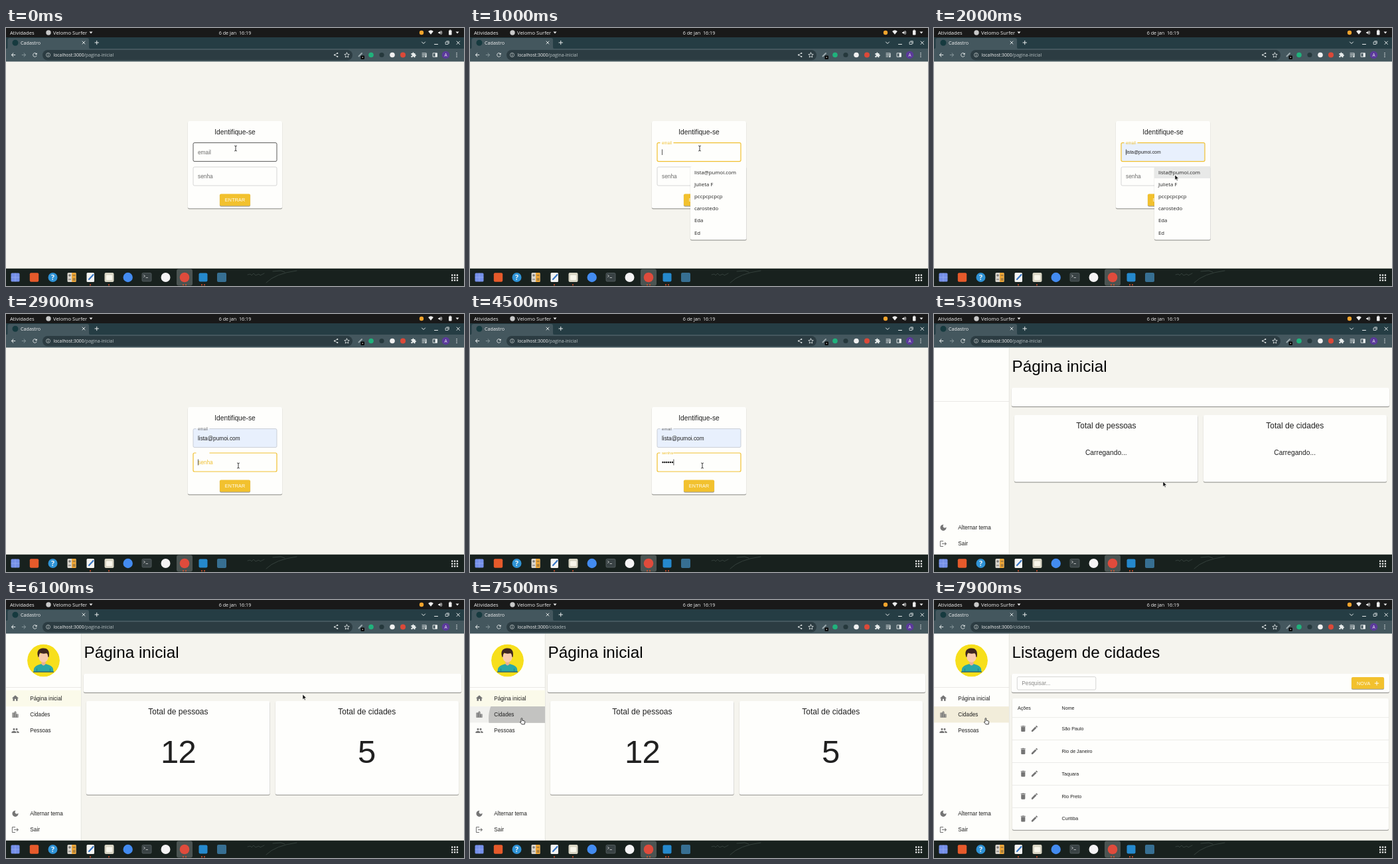
Recreate the animation shown at these times as an HTML page. Size 690 by 388 pixels, loop 8 s.

```html
<!DOCTYPE html>
<html lang="pt-BR">
<head>
<meta charset="utf-8">
<title>Cadastro</title>
<style>
html, body { margin: 0; width: 100%; height: 100%; overflow: hidden; background: #f5f4ee; }
svg { display: block; width: 100vw; height: 100vh; }
text { font-family: "Liberation Sans", Arial, sans-serif; fill: #202020; white-space: pre; }
.ui text { font-family: "Open Sans", "Noto Sans", sans-serif; fill: #f2f2f2; }
.menu text { font-family: "Open Sans", "Noto Sans", sans-serif; }
.line { fill: none; stroke-linecap: round; stroke-linejoin: round; }
</style>
</head>
<body>
<svg id="stage" viewBox="0 0 690 388" preserveAspectRatio="none"></svg>
<script>
const LOOP = 8000, LOGIN_END = 5100, DATA = 5600, LIST = 7600;
const EMAIL = 'lista@pumoi.com';
const YELLOW = '#f0c030';

// Drawing helpers
const text = (x, y, size, str, more = '') => `<text x="${x}" y="${y}" font-size="${size}" ${more}>${str}</text>`;
const mid = (x, y, size, str, more = '') => text(x, y, size, str, `text-anchor="middle" ${more}`);
const rect = (x, y, w, h, fill, r = 0, more = '') =>
  `<rect x="${x}" y="${y}" width="${w}" height="${h}" rx="${r}" fill="${fill}" ${more}/>`;
const raised = (x, y, w, h, fill) =>
  rect(x - .4, y + .4, w + .8, h + 1, '#0000001c', 2.400) + rect(x, y + 1, w, h, '#00000050', 2) + rect(x, y, w, h, fill, 2);
const paper = (x, y, w, h) => raised(x, y, w, h, '#fefefc');
const button = (x, y, w, h) => raised(x, y, w, h, '#f2c12e');
const dot = (x, y, r, fill) => `<circle cx="${x}" cy="${y}" r="${r}" fill="${fill}"/>`;
const line = (d, color, w = 1) => `<path class="line" d="${d}" stroke="${color}" stroke-width="${w}"/>`;
const during = (from, to, body) => `<g data-on="${from} ${to}">${body}</g>`;

const ICONS = {
  home: 'M10 20v-6h4v6h5v-8h3L12 3 2 12h3v8z',
  city: 'M15 11V5l-3-3-3 3v2H3v14h18V11h-6zm-8 8H5v-2h2v2zm0-4H5v-2h2v2zm0-4H5V9h2v2zm6 8h-2v-2h2v2zm0-4h-2v-2h2v2zm0-4h-2V9h2v2zm0-4h-2V5h2v2zm6 12h-2v-2h2v2zm0-4h-2v-2h2v2z',
  people: 'M16 11a3 3 0 100-6 3 3 0 000 6zM8 11a3 3 0 100-6 3 3 0 000 6zm0 2c-2.3 0-7 1.2-7 3.5V19h14v-2.5c0-2.3-4.7-3.5-7-3.5zm8 0l-1 .05c1.2.85 2 2 2 3.45V19h6v-2.5c0-2.3-4.7-3.5-7-3.5z',
  moon: 'M12 3a9 9 0 109 9c0-.5 0-.9-.1-1.4a5.4 5.4 0 01-4.4 2.3 5.4 5.4 0 01-3.1-9.8C12.900 3 12.500 3 12 3z',
  exit: 'M17 7l-1.400 1.400L18.200 11H8v2h10.200l-2.600 2.600L17 17l5-5zM4 5h8V3H4a2 2 0 00-2 2v14a2 2 0 002 2h8v-2H4z',
  trash: 'M6 19a2 2 0 002 2h8a2 2 0 002-2V7H6zM19 4h-3.500l-1-1h-5l-1 1H5v2h14z',
  pencil: 'M3 17.250V21h3.750L17.800 9.900l-3.750-3.750zM20.700 7a1 1 0 000-1.400l-2.300-2.300a1 1 0 00-1.400 0l-1.900 1.800 3.750 3.750z',
  back: 'M20 11H7.800l5.600-5.600L12 4l-8 8 8 8 1.400-1.400L7.800 13H20z',
  next: 'M4 11h12.200l-5.600-5.600L12 4l8 8-8 8-1.400-1.400 5.600-5.600H4z',
  reload: 'M17.650 6.350A8 8 0 1019.700 14h-2.100A6 6 0 1112 6c1.700 0 3.100.7 4.200 1.800L13 11h7V4z',
  puzzle: 'M20.500 11H19V7a2 2 0 00-2-2h-4V3.500a2.500 2.500 0 00-5 0V5H4a2 2 0 00-2 2v3.800h1.500a2.700 2.700 0 010 5.400H2V20a2 2 0 002 2h3.800v-1.500a2.700 2.700 0 015.400 0V22H17a2 2 0 002-2v-4h1.500a2.500 2.500 0 000-5z',
  wifi: 'M12 21L1 7.500a17 17 0 0122 0z',
  sound: 'M3 9v6h4l5 5V4L7 9zM14 8v8a4.500 4.500 0 000-8zM14 3.500v2a7 7 0 010 13v2a9 9 0 000-17z'
};
const icon = (name, x, y, size = 12.2, fill = '#757575') =>
  `<path transform="translate(${x - size / 2} ${y - size / 2}) scale(${size / 24})" d="${ICONS[name]}" fill="${fill}"/>`;

function topBar() {
  return rect(0, 0, 690, 14, '#191919') +
    text(6, 9.700, 7.600, 'Atividades') + dot(64, 7, 3.700, '#c9c9c9') +
    text(71, 9.700, 7.700, 'Velomo Surfer') + '<path d="M125.500 5.500h5l-2.500 3z" fill="#eee"/>' +
    mid(345, 9.600, 7.200, '6 de jan  16:19') +
    dot(626, 7, 3.200, '#f3a32c') + icon('wifi', 640, 6.500, 8.500, '#eee') + icon('sound', 654.500, 7, 8.500, '#eee') +
    rect(667, 3.500, 4.500, 7, '#eee', .8) + rect(668.300, 2.600, 2, 1, '#eee') +
    '<path d="M677.500 5.500h5l-2.500 3z" fill="#eee"/>';
}

function browser() {
  const W = '#e8ecec';
  let s = rect(0, 14, 690, 18, '#253d44') +
    '<path d="M0 31.500q2.500 0 2.500-3V18q0-3 3-3H122q3 0 3 3v10.500q0 3 3 3z" fill="#44575e"/>' +
    rect(0, 31, 690, 19.500, '#44575e') +
    dot(14, 22.200, 4.500, '#163a3f') + text(22, 24.800, 7.200, 'Cadastro') +
    line('M115 20l4 4m0-4l-4 4', W, .9) + line('M134 22h5.500m-2.750-2.750v5.500', W, 1) +
    line('M626.500 21l2.500 2.500 2.500-2.500', W) + line('M645.500 24.500h5', W) +
    line('M662.500 21h3.500v3.500h-3.500zM663.800 19.800h3.500v3.500', W, .8) + line('M679 20l4.500 4.500m0-4.500l-4.500 4.500', W) +
    icon('back', 11, 40.500, 9.500, W) + icon('next', 27, 40.500, 9.500, '#85959a') + icon('reload', 43.500, 40.500, 9.500, W) +
    rect(55, 33, 467, 15.500, '#2c3c42', 7.700) +
    '<circle cx="63.500" cy="40.500" r="3" fill="none" stroke="#c5cccc" stroke-width=".8"/>' + line('M63.500 40.200v1.700M63.500 38.700v.1', '#c5cccc', .8) +
    text(71.500, 43, 6.850, 'localhost:3000');
  s += during(0, 7400, text(117.500, 43, 6.900, '/pagina-inicial', 'style="fill:#b8c2c4"'));
  s += during(7400, LOOP, text(117.500, 43, 6.900, '/cidades', 'style="fill:#b8c2c4"'));
  s += line('M499 38l-4 2.500 4 2.500', W, .7) + dot(499.300, 38, 1.100, W) + dot(495, 40.500, 1.100, W) + dot(499.300, 43, 1.100, W) +
    line('M513.500 37l1.100 2.400 2.600.3-1.900 1.800.5 2.600-2.300-1.300-2.300 1.300.5-2.600-1.900-1.800 2.600-.3z', W, .8);
  s += line('M531.500 42.500l4.500-4.500', '#9aa7ab', 2) + rect(534.500, 41.500, 5.500, 5.500, '#080808', 1) + dot(537.300, 44.300, .8, '#eee') +
    dot(550, 40.500, 3.800, '#20b27c') + dot(566, 40.500, 3.600, '#25383c') + dot(582, 40.500, 3.800, '#f0f0f0') +
    dot(598, 40.500, 4, '#dc4938') + icon('puzzle', 614, 40.500, 8.800, W);
  s += line('M627 38h6M627 40.500h6M627 43h3M633 43v-4.500', W, 1) + dot(632.300, 43, 1.200, W) +
    line('M643.500 37.800h6v5.500h-6z', W, .9) + rect(646.500, 37.800, 3, 5.500, W) +
    dot(662.500, 40.500, 5.800, '#5b3a9b') + mid(662.500, 43, 6.500, 'A') +
    [37.700, 40.500, 43.300].map(y => dot(679, y, .8, W)).join('');
  return s;
}

function dock() {
  let s = rect(0, 361.700, 690, 27, '#18211e') +
    line('M364 371l4-1 2 2 3-3 3 3 5-2 2 2 6-3M392 383q14-14 46-18M402 366l12-1 6 2', '#3b4843', .8) +
    rect(257, 362.500, 24, 25, '#4b5452', 3);
  s += rect(7.500, 368.500, 13, 13, '#7590e8', 1.500) + line('M14 369v12M8 375h12', '#a5b7f5', .5) +
    rect(35.800, 368.300, 13.400, 13.400, '#e65a2b', 2) +
    dot(70.500, 375, 7, '#2f93d6') + mid(70.500, 378.800, 10.500, '?', 'font-weight="700"') +
    rect(92.500, 368, 13, 14, '#d9d5cd', 1.500) + rect(99, 368, 6.500, 14, '#eda637', 1) +
    line('M94.500 372h3M96 370.500v3M94.500 378h3M101 372h3M101 377h3M101 379h3', '#444', .8) +
    rect(121.500, 368, 11.500, 14, '#f4f4f2', 1.500) + line('M125 378l6.500-7', '#3977c5', 2.200) +
    rect(148.500, 368, 14, 14, '#d9d6c5', 2) + rect(151, 371.500, 9, 7.500, '#f7f5ea', 1) +
    dot(183.700, 375, 7.200, '#438bf0') +
    rect(205, 368.500, 14, 12.500, '#394244', 1.500, 'stroke="#6b7476" stroke-width=".6"') + line('M207.500 371.500l2 1.500-2 1.500M211 375.500h2.500', '#eee', .7) +
    dot(240.500, 375, 7, '#f5f4f5') + dot(269, 375, 7.300, '#df4b3c') +
    rect(290.500, 368.500, 13, 13, '#2589cd', 2) + rect(318, 368, 14, 14, '#376f92', 2);
  s += [127, 155, 267, 271, 295, 299].map(x => dot(x, 386.300, 1, '#e5532d')).join('');
  for (let i = 0; i < 9; i++) s += rect(671 + i % 3 * 3.900, 370.500 + (i / 3 | 0) * 3.900, 2.300, 2.300, '#f3f3f3', .4);
  return s;
}

// Outlined field, optionally with a gap for the raised label
const outline = (y, color, w, gap) =>
  `<path d="M${gap ? 306.500 : 284} ${y}H406q2 0 2 2v24q0 2-2 2H284q-2 0-2-2v-24q0-2 2-2${gap ? 'h2.500' : ''}" fill="none" stroke="${color}" stroke-width="${w}"/>`;
const label = (id, str) => `<g id="${id}">${text(0, 0, 8.300, str, 'style="fill:inherit"')}</g>`;

function login() {
  const names = [EMAIL, 'Julieta F', 'pccpcpcpcp', 'carostedo', 'Eda', 'Ed'];
  const mailY = 172.600, passY = 209;
  let s = paper(274, 140, 142, 131.300) + mid(345, 160.300, 10.250, 'Identifique-se');
  s += during(1500, LOGIN_END, rect(282, mailY, 126, 28, '#e8f0fd', 2)) +
    during(0, 700, outline(mailY, '#303030', .8)) +
    during(700, 2900, outline(mailY, YELLOW, 1.200, true)) +
    during(2900, LOGIN_END, outline(mailY, '#b9bfc8', .7, true)) +
    label('mailLabel', 'email') +
    during(1500, 2100, text(289, 189.400, 6.850, EMAIL)) +
    during(2100, LOGIN_END, text(289, 189.600, 8.270, EMAIL)) +
    during(700, 2100, rect(289, 182.500, .7, 8.500, '#111')) +
    during(2100, 2900, rect(353.300, 182.500, .7, 8.500, '#111'));
  s += during(0, 2200, outline(passY, '#c6c6c6', .7)) +
    during(2200, 2900, outline(passY, '#303030', .8)) +
    during(2900, LOGIN_END, outline(passY, YELLOW, 1.200, true)) + label('passLabel', 'senha');
  [3300, 3500, 3500, 3700, 3900, 4100].forEach((t, i) =>
    s += during(t, LOGIN_END, dot(290.500 + i * 2.900, 223, 1.200, '#151515')));
  s += during(2900, LOGIN_END, `<g id="caret">${rect(0, 218.500, .7, 9, '#111')}</g>`);
  s += button(322, 249.500, 46, 18) +
    during(4900, LOGIN_END, rect(322, 249.500, 46, 18, '#c99c18', 2)) +
    mid(345.100, 261.200, 7.150, 'ENTRAR', 'letter-spacing=".2" style="fill:#fffdf5"');
  s += during(1000, 2100, '<g class="menu">' + paper(332, 208, 84.500, 110.500) +
    during(1500, 2100, rect(332, 208, 84.500, 18, '#e8e9e8')) +
    names.map((n, i) => text(338, 219.500 + i * 18.200, 7.800, n)).join('') + '</g>');
  return s;
}

function avatar() {
  return `<clipPath id="face"><circle cx="56.500" cy="91" r="24.500"/></clipPath><g clip-path="url(#face)">` +
    dot(56.500, 91, 24.500, '#f7df1c') +
    '<path d="M41.500 108q0-8 6-10l6-2h6l6 2q6 2 6 10z" fill="#2ba7a5"/>' +
    '<path d="M53.500 91h6v5.500q-3 4-6 0z" fill="#e9b091"/>' +
    '<path d="M49 82q0 7 2.500 9.500 5 4.500 10 0 2.500-2.500 2.500-9.500-7.500-5-15 0z" fill="#f8cbae"/>' +
    '<path d="M48.500 86q-4-12 6.500-13.500 12-1 9.500 13.500l-1.200-.5q0-4-2-5.500-6 1.500-10-.5-1.800 2.500-1.800 6z" fill="#3f2620"/>' +
    line('M46.500 107v-3.500M66.500 107v-3.500', '#1c807f', .8) + rect(41, 107.500, 31, 1.300, '#355c64') + '</g>';
}

function drawer() {
  const items = [['home', 'Página inicial'], ['city', 'Cidades'], ['people', 'Pessoas']];
  const body = avatar() +
    during(5400, LIST, rect(0, 135.700, 113, 24.400, '#fbfaea')) +
    during(6500, LIST, rect(0, 160.100, 113, 24.300, '#f1f1ee')) +
    during(LIST, LOOP, rect(0, 160.100, 113, 24.300, '#f2edda')) +
    `<clipPath id="row">${rect(0, 160.100, 113, 24.300, '#000')}</clipPath>` +
    during(7400, 7800, `<g clip-path="url(#row)"><g id="ripple">${dot(0, 0, 50, '#000')}</g></g>`) +
    items.map(([name, str], i) => icon(name, 14, 147.800 + i * 24.300) + text(36.300, 150.500 + i * 24.300, 8.200, str)).join('');
  return rect(0, 50.500, 113, 311.300, '#fefefb') + rect(112.800, 50.500, .7, 311.300, '#dededa') +
    rect(0, 131.300, 113, .6, '#dddcd8') + during(5400, LOOP, body) +
    icon('moon', 14, 321.300) + text(36.300, 324, 8.250, 'Alternar tema') +
    icon('exit', 14, 345.500) + text(36.300, 348.300, 8.250, 'Sair');
}

const heading = str => text(117.500, 86.500, 24.300, str, 'style="fill:#050505"');

function home() {
  const cards = h => paper(121, 152, 276.500, h) + paper(406, 152, 276, h);
  return heading('Página inicial') +
    during(LOGIN_END, DATA, cards(100.500) + mid(259.300, 212, 10.250, 'Carregando...') + mid(543.700, 212, 10.250, 'Carregando...')) +
    during(DATA, LIST, cards(140.700) + mid(259.500, 245.200, 49, '12', 'letter-spacing="-.7"') + mid(543.700, 245.200, 49, '5')) +
    mid(259.400, 171.800, 12.050, 'Total de pessoas') + mid(543.800, 171.800, 12.050, 'Total de cidades');
}

function list() {
  const cities = ['São Paulo', 'Rio de Janeiro', 'Taquara', 'Rio Preto', 'Curitiba'];
  const rows = cities.map((name, i) => {
    const y = 193.500 + i * 33.850;
    return rect(118, y - 17, 567, .6, '#dfdfdc') + icon('trash', 134.300, y) + icon('pencil', 151.500, y) + text(192.500, y + 2.500, 7.150, name);
  }).join('');
  return heading('Listagem de cidades') +
    rect(125.300, 115.500, 118.500, 19.500, 'none', 2, 'stroke="#c4c4c4" stroke-width=".7"') +
    text(132.300, 128.300, 8.250, 'Pesquisar...', 'style="fill:#8a8a8a"') +
    button(629, 116, 49, 17.700) +
    text(637, 127.700, 7.150, 'NOVA', 'letter-spacing=".2" style="fill:#fffdf5"') +
    line('M664.200 125.200h5.600m-2.800-2.800v5.600', '#fffdf5', 1) +
    during(LIST, 7700, paper(118, 148, 567, 29)) +
    during(7700, LOOP, paper(118, 148, 567, 197.700) + rows) +
    text(126, 164.700, 7.150, 'Ações') + text(192.500, 164.700, 7.150, 'Nome');
}

function pointer() {
  const beam = 'M-1.500-4q1.500 0 1.500 1V3q0 1-1.500 1M1.500-4Q0-4 0-3M0 3q0 1 1.500 1';
  const arrow = '<path d="M0 0v7.600l1.800-1.700 1.200 2.800 1.200-.5-1.200-2.700h2.600z" fill="#111" stroke="#fff" stroke-width=".5"/>';
  const hand = '<path d="M-1 .5a.9.9 0 011.800 0v2.700l3 .7q1 .3.9 1.500l-.5 3.500H0L-2.600 5.600q.6-1.200 1.600-.1z" fill="#fff" stroke="#111" stroke-width=".8"/>';
  const ibeam = line(beam, '#fff', 1.600) + line(beam, '#111', .8);
  return '<g id="pointer">' + during(0, 1400, ibeam) + during(1400, 2100, arrow) + during(2100, 4600, ibeam) +
    during(4600, LOGIN_END, hand) + during(LOGIN_END, 6500, arrow) + during(6500, LOOP, hand) + '</g>';
}

const stage = document.getElementById('stage');
stage.innerHTML = rect(0, 0, 690, 388, '#f5f4ee') +
  during(0, LOGIN_END, login()) +
  during(LOGIN_END, LOOP, drawer() + paper(117, 111, 569, 28) + during(LOGIN_END, LIST, home()) + during(LIST, LOOP, list())) +
  `<g class="ui">${topBar() + browser() + dock()}</g>` + pointer();

// Steps are [time, properties, jumps to the next step]
function play(el, steps) {
  const frames = steps.map(([t, props, jumps]) =>
    ({ ...props, offset: t / LOOP, easing: jumps ? `steps(${jumps}, end)` : 'step-end' }));
  const last = frames[frames.length - 1];
  if (last.offset < 1) frames.push({ ...last, offset: 1 });
  el.animate(frames, { duration: LOOP, iterations: Infinity });
}
const byId = id => document.getElementById(id);
const at = (x, y, scale = 1) => ({ transform: `translate(${x}px, ${y}px) scale(${scale})` });

for (const el of document.querySelectorAll('[data-on]')) {
  const [from, to] = el.dataset.on.split(' ').map(Number);
  const steps = [[from, { opacity: 1 }], [to, { opacity: 0 }]];
  if (from) steps.unshift([0, { opacity: 0 }]);
  play(el, steps);
}

function floatLabel(id, y, start, blur) {
  const big = at(289, y), small = at(289, y - 14.800, .75);
  play(byId(id), [[0, big], [start, big, 2], [start + 200, small]]);
  play(byId(id), [[0, { fill: '#6b6b6b' }], [start, { fill: YELLOW }], [blur, { fill: '#6b6b6b' }]]);
}
floatLabel('mailLabel', 189.700, 700, 2900);
floatLabel('passLabel', 226, 2900, LOGIN_END);

play(byId('caret'), [[0, at(289, 0)], [3300, at(292.400, 0)], [3500, at(298, 0)],
  [3700, at(300.900, 0)], [3900, at(303.600, 0)], [4100, at(306.400, 0)]]);

play(byId('ripple'), [[0, { ...at(78, 178, .3), opacity: 0 }], [7400, { ...at(78, 178, .5), opacity: .19 }],
  [7500, { ...at(78, 178), opacity: .19 }], [7600, { ...at(78, 178, 1.700), opacity: .12 }], [7700, { ...at(78, 178, 1.700), opacity: .05 }]]);

play(byId('pointer'), [[0, at(346, 181)], [1100, at(346, 181), 5], [1600, at(363, 221)],
  [2100, at(363, 224), 4], [2500, at(350, 228)], [4500, at(350, 228), 3], [4800, at(345, 252)],
  [5600, at(345, 252), 4], [6000, at(447, 142)], [6200, at(298, 128), 2], [6400, at(125, 160), 2], [6600, at(78, 178)]]);
</script>
</body>
</html>
```
